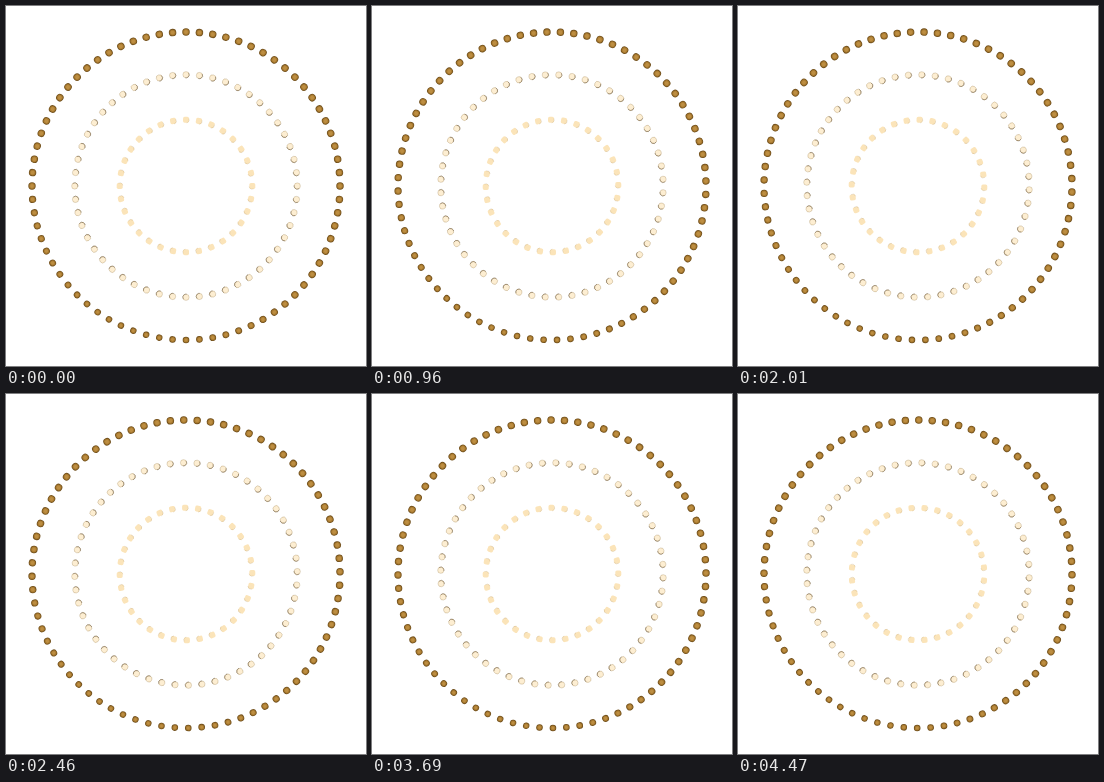
An HTML page with a canvas for the animation above (4.5 s loop, 360 by 360 pixels).

```html
<!DOCTYPE html>
<html lang="en">
<head>
<meta charset="utf-8">
<title>Dotted rings</title>
<style>
html, body { margin: 0; width: 100%; height: 100%; overflow: hidden; background: #fff; }
canvas { display: block; width: 100vmin; height: 100vmin; }
</style>
</head>
<body>
<canvas></canvas>
<script>
const LOOP = 4500, TICK = 30, STEP = 51, SIZE = 360, TAU = Math.PI * 2;
const canvas = document.querySelector('canvas');
const ctx = canvas.getContext('2d');
const ratio = window.devicePixelRatio || 1;
canvas.width = canvas.height = SIZE * ratio;

// Pose times and their holds in ticks; travel is counted in dot spacings.
const times = [0, 20, 43, 67, 104, 123, 149, 150];
const holds = [1, 1, 2, 2, 2, 2, 1];
const rings = [
  { count: 72, radius: 154, draw: goldDot,
    travel: [0, 10.49, 20.76, 32.45, 50, 58.93, 71.06, 72] },
  { count: 52, radius: 111.3, draw: creamDot,
    travel: [0, -7.5, -15.5, -23.72, -36, -42.72, -51.72, -52] },
  { count: 32, radius: 66.3, draw: sandDot,
    travel: [0, 4.49, 9.36, 14.12, 21.85, 25.96, 31.5, 32] }
];

// The rings advance in small uneven ticks rather than continuously.
function poseAt(ms) {
  const tick = Math.floor((ms % LOOP) / TICK);
  let seg = times.length - 2;
  while (times[seg] > tick) seg--;
  const moved = tick - times[seg] - holds[seg];
  if (moved < 0) return { seg, part: 0 };
  const span = times[seg + 1] - times[seg] - holds[seg];
  const steps = Math.round(span * TICK / STEP);
  return { seg, part: (1 + Math.floor(moved * steps / span)) / (steps + 1) };
}

function disc(r, fill) {
  ctx.beginPath();
  ctx.arc(0, 0, r, 0, TAU);
  ctx.fillStyle = fill;
  ctx.fill();
}

function goldDot(angle) {
  const low = Math.max(0, Math.cos(angle - 3.5));
  const r = 3.75 - 0.5 * low * low;
  disc(r, '#71501d');
  disc(r - 0.8, '#a97a2f');
  disc(r - 1.8, '#bd8e42');
}

function block(half, corner, fill) {
  ctx.beginPath();
  ctx.roundRect(-half, -half, half * 2, half * 2, corner);
  ctx.fillStyle = fill;
  ctx.fill();
}

function edge(r, from, to, color) {
  ctx.beginPath();
  ctx.arc(0, 0, r, from, to);
  ctx.strokeStyle = color;
  ctx.lineWidth = 0.7;
  ctx.stroke();
}

function creamDot() {
  block(2.9, 2, '#fdeed2');
  edge(3.1, 0, TAU, 'rgba(150,120,70,.4)');
  edge(3.2, -0.6, 1.8, 'rgba(90,68,35,.6)');
}

function sandDot() {
  block(3, 1.7, '#fbe4b9');
  edge(3.2, -0.4, 1.4, 'rgba(150,120,70,.25)');
}

function draw(ms) {
  const { seg, part } = poseAt(ms);
  ctx.setTransform(ratio, 0, 0, ratio, 0, 0);
  ctx.fillStyle = '#fff';
  ctx.fillRect(0, 0, SIZE, SIZE);
  for (const { count, radius, travel, draw } of rings) {
    const shift = travel[seg] + (travel[seg + 1] - travel[seg]) * part;
    for (let i = 0; i < count; i++) {
      const angle = (i + shift) * TAU / count;
      ctx.save();
      ctx.translate(180 + radius * Math.sin(angle), 180 - radius * Math.cos(angle));
      ctx.rotate(angle);
      draw(angle);
      ctx.restore();
    }
  }
}

const start = performance.now();
function frame() {
  draw(performance.now() - start);
  requestAnimationFrame(frame);
}
frame();
</script>
</body>
</html>
```
